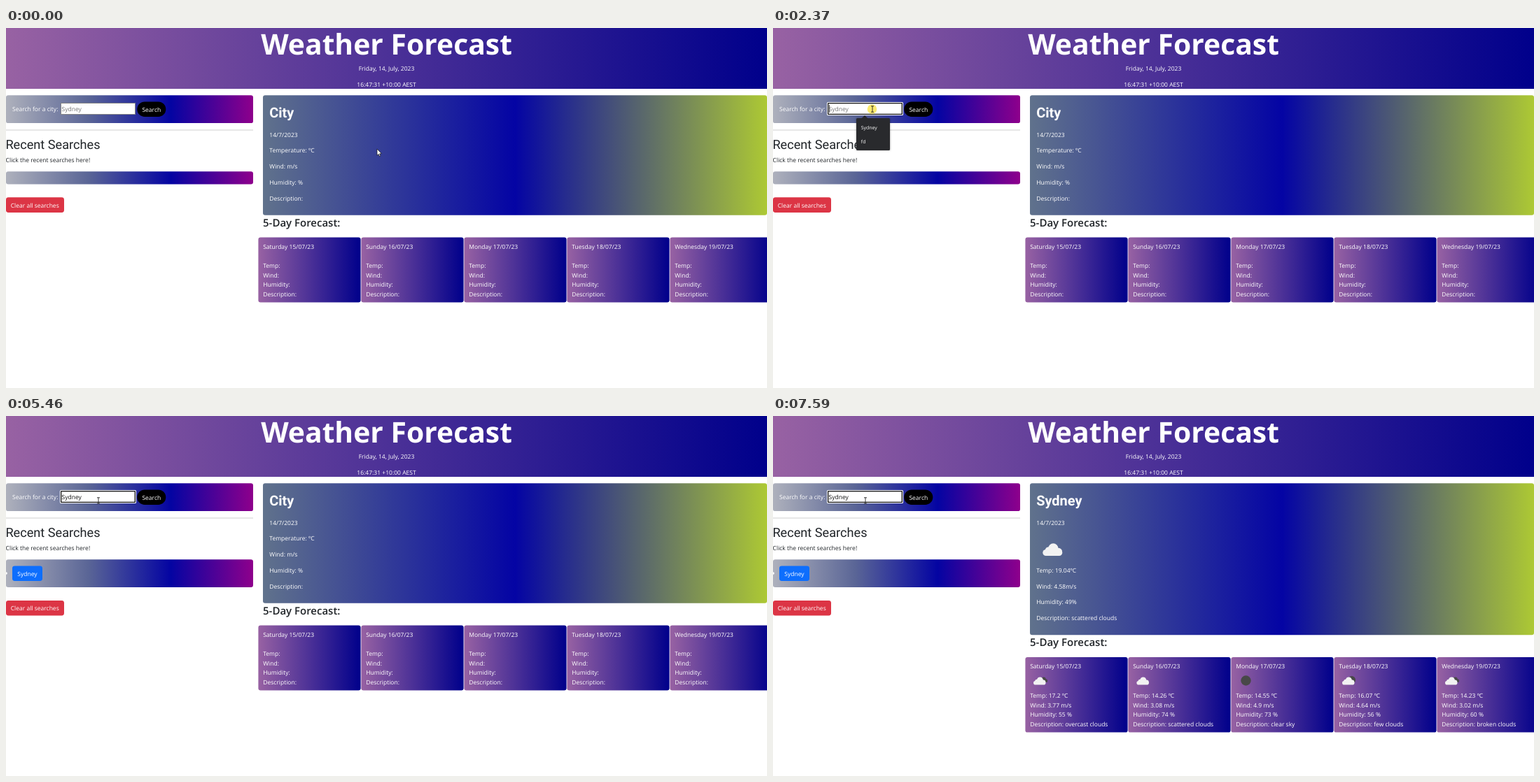
Animation, 1087 px wide and 515 px high, one loop 8000 ms. Source, as an HTML page with a canvas:

```html
<!DOCTYPE html>
<html lang="en">
<head>
<meta charset="utf-8">
<title>Weather Forecast</title>
<style>
html, body { margin: 0; width: 100%; height: 100%; overflow: hidden; background: #fff; }
canvas { display: block; width: 1087px; height: 515px; }
</style>
</head>
<body>
<canvas id="stage" width="1087" height="515"></canvas>
<script>
const ctx = document.getElementById('stage').getContext('2d');
const LOOP = 8000;
const SANS = '"Open Sans", "Noto Sans", sans-serif';
const ROBOTO = 'Roboto, sans-serif';
const BODY = `8.53px ${SANS}`;
const DARK = '#212529';
const LINE = 13.62, PARA = 22.7;

const VIOLET = ['#9862a3', '#00008b'];
const SEARCH = ['#aeb1bc', '#5a6596', '#0404a2', '#8e008c'];
const CITY = ['#60728c', '#0404a4', '#adc934'];

const TYPED = [[3800, 1], [4260, 2], [4400, 3], [4600, 4], [4670, 5], [4940, 6]];
const CARET_OFF = [[2900, 3460], [5460, 5990], [6530, 7060], [7590, 8000]];

const DAYS = [
  ['Saturday 15/07/23', '17.2', '3.77', 55, 'overcast clouds', 'double'],
  ['Sunday 16/07/23', '14.26', '3.08', 74, 'scattered clouds', 'cloud'],
  ['Monday 17/07/23', '14.55', '4.9', 73, 'clear sky', 'moon'],
  ['Tuesday 18/07/23', '16.07', '4.64', 56, 'few clouds', 'moonCloud'],
  ['Wednesday 19/07/23', '14.23', '3.02', 60, 'broken clouds', 'double']
];

// Pointer path: time, x, y
const PATH = [
  [462, 530, 173], [650, 610, 121], [800, 735, 190], [900, 766, 300],
  [1000, 735, 388], [1070, 671, 384], [1280, 428, 328], [1600, 300, 215],
  [1850, 205, 140], [2100, 160, 109]
];

function text(s, x, y, color = '#fff', font = BODY, align = 'left') {
  ctx.font = font;
  ctx.fillStyle = color;
  ctx.textAlign = align;
  ctx.fillText(s, x, Math.round(y));
}

function box(x, y, w, h, r, fill) {
  ctx.fillStyle = fill;
  ctx.beginPath();
  ctx.roundRect(x, y, w, h, r);
  ctx.fill();
}

function circle(x, y, r, fill) {
  ctx.fillStyle = fill;
  ctx.beginPath();
  ctx.arc(x, y, r, 0, Math.PI * 2);
  ctx.fill();
}

function blend(x, w, colors) {
  const g = ctx.createLinearGradient(x, 0, x + w, 0);
  colors.forEach((c, i) => g.addColorStop(i / (colors.length - 1), c));
  return g;
}

function panel(x, y, w, h, colors) {
  box(x, y, w, h, 3.2, blend(x, w, colors));
}

// Cloud with its left bottom corner at x, y
function cloud(x, y, w, color) {
  const u = w / 28;
  box(x, y - 9 * u, w, 9 * u, 4.5 * u, color);
  circle(x + 8 * u, y - 8 * u, 4.5 * u, color);
  circle(x + 15 * u, y - 10.5 * u, 7.2 * u, color);
  circle(x + 22.5 * u, y - 6 * u, 5.2 * u, color);
}

function icon(kind, x, y) {
  const gray = '#484848', white = '#f2f2f2';
  if (kind === 'moon') return circle(x + 14.3, y - 6, 7.2, gray);
  if (kind === 'double') cloud(x + 13, y - 3.5, 12, gray);
  if (kind === 'moonCloud') circle(x + 18.5, y - 7, 5.4, gray);
  cloud(x + (kind === 'cloud' ? 5.2 : 4.8), y, 17.5, white);
}

function drawHeader() {
  ctx.fillStyle = blend(0, 1087, VIOLET);
  ctx.fillRect(0, 0, 1087, 87);
  text('Weather Forecast', 543.5, 38, '#fff', `bold 40.86px ${SANS}`, 'center');
  text('Friday, 14, July, 2023', 543.5, 61, '#fff', BODY, 'center');
  text('16:47:31 +10:00 AEST', 543.5, 83.6, '#fff', BODY, 'center');
}

function drawInput(t) {
  if (t < 2230) {
    box(78, 107, 107, 17, 0, '#858585');
    box(79, 108, 105, 15, 0, '#fff');
  } else {
    box(77, 106, 109, 19, 1.5, '#fff');
    box(78, 107, 107, 17, 1, '#101010');
    box(79.3, 108.3, 104.4, 14.4, 0, '#fff');
  }
  const count = TYPED.filter(k => t >= k[0]).length;
  const value = 'Sydney'.slice(0, count);
  text(value || 'Sydney', 79.6, 119, value ? '#111' : '#757575');
  const off = CARET_OFF.some(([a, b]) => t >= a && t < b);
  if (t >= 2230 && !off) {
    const x = 79.6 + (value ? ctx.measureText(value).width : 0);
    ctx.fillStyle = '#222';
    ctx.fillRect(Math.round(x), 110, 0.8, 11);
  }
}

function drawSearch(t) {
  const found = t >= 5460;
  panel(0, 96.3, 353, 39.8, SEARCH);
  text('Search for a city:', 9, 119);
  drawInput(t);
  box(187.3, 105.4, 41, 21.6, 10.8, '#000');
  text('Search', 207.8, 120, '#fff', BODY, 'center');

  ctx.fillStyle = '#cfcfcf';
  ctx.fillRect(0, 145.5, 353, 1);
  text('Recent Searches', -0.6, 172.6, DARK, `18.16px ${ROBOTO}`);
  text('Click the recent searches here!', -0.4, 192.3, DARK);

  panel(0, 205.2, 353, found ? 39.8 : 18.3, SEARCH);
  if (found) {
    circle(0.2, 225, 1.7, '#fff');
    box(9, 214.4, 43, 21.6, 3.4, '#0d6efd');
    text('Sydney', 30.5, 229, '#fff', BODY, 'center');
  }
  const y = found ? 263.9 : 242.3;
  box(0, y, 83, 21.6, 3.4, '#dc3545');
  text('Clear all searches', 41.2, y + 14.4, '#fff', BODY, 'center');
}

function drawCity(t) {
  const loaded = t >= 6860;
  panel(367, 96.3, 720, loaded ? 217 : 171.4, CITY);
  text(loaded ? 'Sydney' : 'City', 376.2, 128, '#fff', `bold 19.97px ${ROBOTO}`);
  text('14/7/2023', 376.3, 156);
  const rows = loaded
    ? ['Temp: 19.04ºC', 'Wind: 4.58m/s', 'Humidity: 49%', 'Description: scattered clouds']
    : ['Temperature: ºC', 'Wind: m/s', 'Humidity: %', 'Description:'];
  const top = loaded ? 223.8 : 178.4;
  rows.forEach((s, i) => text(s, 376.3, top + i * PARA));
  if (t >= 6910) cloud(385.3, 200, 28, '#f2f2f2');
}

function drawDays(t) {
  const loaded = t >= 6860, icons = t >= 6910;
  const dy = loaded ? 45.4 : 0, gap = icons ? 14.8 : 0;
  text('5-Day Forecast:', 367, 284 + dy, DARK, `600 15px ${SANS}`);
  DAYS.forEach(([day, temp, wind, wet, sky, kind], i) => {
    const x = 360.4 + 147 * i, y = 299.5 + dy;
    panel(x, y, 146.2, 92.9 + gap, VIOLET);
    text(day, x + 6.8, y + 16);
    const rows = loaded
      ? [`Temp: ${temp} ºC`, `Wind: ${wind} m/s`, `Humidity: ${wet} %`, `Description: ${sky}`]
      : ['Temp:', 'Wind:', 'Humidity:', 'Description:'];
    rows.forEach((s, k) => text(s, x + 6.8, y + gap + 43.4 + k * LINE));
    if (icons) icon(kind, x + 6.8, y + 39.6);
  });
}

function drawSuggestions(t) {
  if (t < 2300 || t >= 5130) return;
  const both = t < 3800;
  const fade = t < 4940 ? 1 : 0.75 - 0.25 * Math.floor((t - 4940) / 64);
  ctx.save();
  ctx.globalAlpha = Math.max(0, fade);
  ctx.shadowColor = 'rgba(0,0,0,.4)';
  ctx.shadowBlur = 3;
  box(119, 129, 48, both ? 46 : 26, 1.5, '#292a2d');
  ctx.shadowColor = 'transparent';
  ctx.beginPath();
  ctx.moveTo(126.5, 129.2);
  ctx.lineTo(131, 125);
  ctx.lineTo(135.5, 129.2);
  ctx.fill();
  const small = `6.9px ${SANS}`;
  text('Sydney', 125.8, 144.6, '#fff', small);
  if (both) text('fd', 125.8, 165, '#fff', small);
  ctx.restore();
}

function spline(t) {
  let i = 0;
  while (i < PATH.length - 2 && t >= PATH[i + 1][0]) i++;
  const at = n => PATH[Math.min(Math.max(n, 0), PATH.length - 1)];
  const [a, b, c, d] = [at(i - 1), at(i), at(i + 1), at(i + 2)];
  const u = Math.min(1, (t - b[0]) / (c[0] - b[0]));
  return [1, 2].map(k => b[k] + 0.5 * u * (c[k] - a[k]
    + u * (2 * a[k] - 5 * b[k] + 4 * c[k] - d[k]
    + u * (3 * (b[k] - c[k]) + d[k] - a[k]))));
}

function pointerAt(t) {
  if (t >= 2560) return [132, 121];
  if (t >= 2500) return [137, 119];
  if (t >= 2170) return [142, 116];
  if (t < 530) return spline(462);
  if (t < 1350) return spline(530 + 67.5 * Math.min(11, Math.floor((t - 530) / 67.5)));
  return spline(1350 + 75 * Math.floor((t - 1350) / 75));
}

function beam(x, y, color) {
  ctx.strokeStyle = color;
  ctx.lineWidth = 0.9;
  ctx.beginPath();
  for (const s of [-4.2, 4.2]) {
    ctx.moveTo(x - 2, y + s);
    ctx.lineTo(x + 2, y + s);
  }
  ctx.moveTo(x, y - 4.2);
  ctx.lineTo(x, y + 4.2);
  ctx.stroke();
}

function arrow(x, y) {
  ctx.beginPath();
  ctx.moveTo(x, y);
  for (const [dx, dy] of [[0, 9.3], [2.1, 7.4], [3.5, 10.6], [5, 10], [3.6, 6.9], [6.4, 6.7]])
    ctx.lineTo(x + dx, y + dy);
  ctx.closePath();
  ctx.fillStyle = '#fff';
  ctx.fill();
  ctx.strokeStyle = '#111';
  ctx.lineWidth = 0.7;
  ctx.stroke();
}

function drawPointer(t) {
  const [x, y] = pointerAt(t);
  const inField = x > 78 && x < 185 && y > 107 && y < 124;
  const col = (x - 360.4) % 147;
  const onRow = y > 334 && y < 387 && x > 360 && col > 6 && col < 55;
  if (t >= 2230 && t < 2500) circle(x - 0.5, y, 6.8, 'rgba(250,225,50,.7)');
  if (inField) beam(x, y, '#222');
  else if (onRow) beam(x, y, 'rgba(125,150,130,.6)');
  else arrow(x, y);
}

function frame(now) {
  const t = now % LOOP;
  ctx.textRendering = 'geometricPrecision';
  ctx.fillStyle = '#fff';
  ctx.fillRect(0, 0, 1087, 515);
  drawHeader();
  drawSearch(t);
  drawCity(t);
  drawDays(t);
  drawSuggestions(t);
  drawPointer(t);
}

const start = performance.now();
function tick() {
  frame(performance.now() - start);
  requestAnimationFrame(tick);
}
tick();
</script>
</body>
</html>
```
